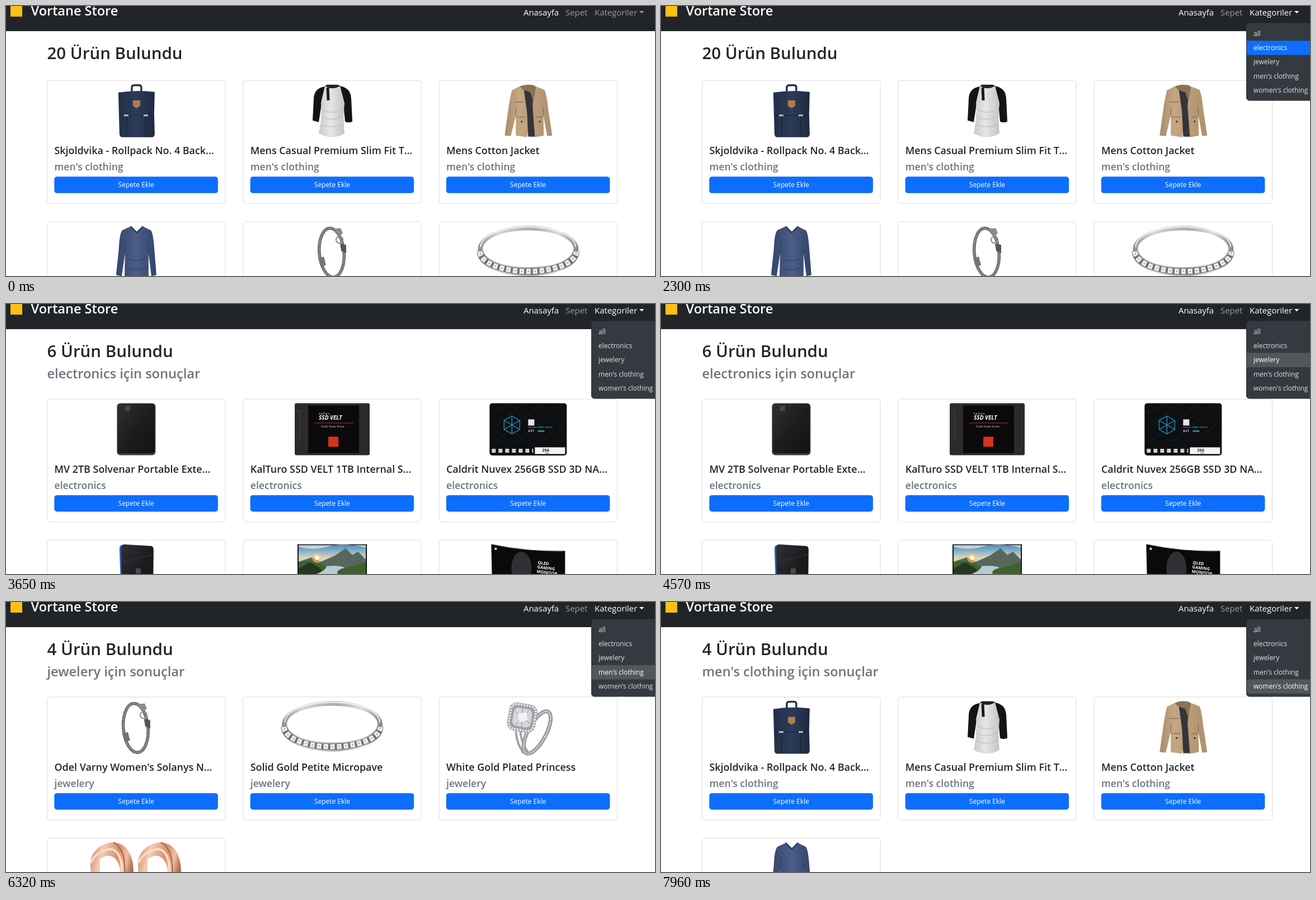
Recreate the animation shown at these times as an HTML page. Size 1160 by 483 pixels, loop 8000 ms.

```html
<!DOCTYPE html>
<html lang="tr">
<head>
<meta charset="utf-8">
<title>Vortane Store</title>
<style>
  html, body { margin: 0; width: 100%; height: 100%; overflow: hidden; background: #fff; }
  svg { display: block; width: 1160px; height: 483px; }
  text { font-family: "Open Sans", "Noto Sans", sans-serif; white-space: pre; }
  .h1 { font-size: 29.5px; font-weight: 600; fill: #212529; }
  .h3 { font-size: 23.6px; font-weight: 600; fill: #6c757d; }
  .title { font-size: 17.9px; font-weight: 600; fill: #212529; }
  .cat { font-size: 17.6px; font-weight: 600; fill: #6c757d; }
  .btn { font-size: 12px; fill: #fff; text-anchor: middle; }
  .brand { font-size: 23.5px; font-weight: 600; fill: #fff; }
  .nav { font-size: 14.9px; }
  .item { font-size: 12px; }
</style>
</head>
<body>
<svg viewBox="0 0 1160 483">
  <defs>
    <linearGradient id="navy" x2="1"><stop stop-color="#222f48"/><stop offset=".5" stop-color="#2b3b59"/><stop offset="1" stop-color="#1f2a41"/></linearGradient>
    <linearGradient id="white" x2="1"><stop stop-color="#c9c9cb"/><stop offset=".45" stop-color="#e6e6e7"/><stop offset="1" stop-color="#c4c4c7"/></linearGradient>
    <linearGradient id="tan" x2="1"><stop stop-color="#a98c6a"/><stop offset=".3" stop-color="#c4a683"/><stop offset="1" stop-color="#ae906d"/></linearGradient>
    <linearGradient id="blue" x2="1"><stop stop-color="#34456b"/><stop offset=".5" stop-color="#4b5e88"/><stop offset="1" stop-color="#33446a"/></linearGradient>
    <linearGradient id="silver" x2="1"><stop stop-color="#8d8d90"/><stop offset=".2" stop-color="#d6d6d8"/><stop offset=".55" stop-color="#a9a9ac"/><stop offset=".8" stop-color="#dcdcde"/><stop offset="1" stop-color="#838386"/></linearGradient>
    <linearGradient id="rose" x2="1" y2=".3"><stop stop-color="#c98264"/><stop offset=".3" stop-color="#f4cdb6"/><stop offset=".65" stop-color="#d5906f"/><stop offset=".85" stop-color="#f0bfa4"/><stop offset="1" stop-color="#b8704f"/></linearGradient>
    <linearGradient id="sky" x2="0" y2="1"><stop stop-color="#4d8fc4"/><stop offset=".3" stop-color="#d9d8c0"/><stop offset="1" stop-color="#7a8f60"/></linearGradient>
    <linearGradient id="case" x2="1" y2="1"><stop stop-color="#2e3033"/><stop offset=".5" stop-color="#1b1d1f"/><stop offset="1" stop-color="#111214"/></linearGradient>

    <g id="bag">
      <path d="M-8 13V5Q-8 1-3 1H5Q9 1 9 5V13" fill="none" stroke="#26334c" stroke-width="3.4"/>
      <path d="M-32 14Q0 9 33 13L32 52L33 88Q33 94 27 94H-24Q-30 94-30 88L-31 52Z" fill="url(#navy)"/>
      <path d="M-31 55H32M-17 55V92M17 55V92" stroke="#18233a" fill="none"/>
      <path d="M-6 28H7V38L.5 42L-6 38Z" fill="#b67b4a"/>
      <path d="M-22 55H-14M13 55H21" stroke="#b9bfc8" stroke-width="3"/>
    </g>
    <g id="raglan">
      <path d="M-12 3C-24 5-32 10-33 25L-35 64L-24 67L-19 34L-6 2ZM13 2C25 5 33 9 34 25L36 66Q29 69 23 66L20 34L6 2Z" fill="#141416"/>
      <path d="M-13 2L-20 32Q-18 60-24 87Q0 101 22 87Q19 60 22 33L14 2Q0 10-13 2Z" fill="url(#white)"/>
      <path d="M-13 2Q0 11 14 2L10 0H-9Z" fill="#222"/>
      <path d="M-8 5L-7 28" stroke="#1b1b1d" stroke-width="5"/>
      <path d="M-18 58Q0 66 18 57M-20 72Q0 79 18 71M-17 45Q-4 52 12 48" stroke="#b9b9bd" fill="none"/>
    </g>
    <g id="jacket">
      <path d="M-15 3L-29 10Q-33 25-37 55L-42 91L-31 92L-22 55L-22 91L-2 94L5 60L12 94L28 91L27 55L34 92L43 91L36 45Q33 16 29 9L13 3Q0-1-15 3Z" fill="url(#tan)"/>
      <path d="M-8 6L10 6L8 40L12 93H0L-2 50Z" fill="#34343a"/>
      <path d="M-15 3Q-4-2 10 1L14 4L9 30L4 14L-9 9Z" fill="#8d7252"/>
      <path d="M-25 31H-8M-21 58H-5M14 58H26M-22 41V56M27 40V56" stroke="#876c4d" fill="none" stroke-width="1.2"/>
      <path d="M-13 66h3M19 66h3" stroke="#4c3b28" stroke-width="3"/>
    </g>
    <g id="vneck">
      <path d="M-10 1L-25 8Q-30 14-31 40L-36 88L-26 90L-20 50L-21 94H22L22 50L27 90L36 88L32 38Q30 12 26 8L12 1L1 11Z" fill="url(#blue)"/>
      <path d="M-10 1L1 12L12 1" fill="none" stroke="#26355a" stroke-width="2.4"/>
      <path d="M-20 50L-18 28M22 50L20 28M-14 60Q0 66 16 58M-15 76Q2 82 18 74" fill="none" stroke="#2d3d62"/>
    </g>
    <g id="bracelet">
      <g transform="rotate(-5 -1 48)" fill="none">
        <ellipse cx="-1" cy="48" rx="22" ry="44" stroke="#626265" stroke-width="5.5"/>
        <ellipse cx="-1" cy="48" rx="22" ry="44" stroke="#b6b6b8" stroke-width="3" stroke-dasharray="1.5 2"/>
      </g>
      <path d="M4 5L15 4L19 13L12 20L8 13Z" fill="#8c8c90"/>
      <circle cx="13" cy="25" r="6" fill="none" stroke="#8a8a8d" stroke-width="2"/>
      <path d="M14 32L25 34V49L16 45Z" fill="#55565a"/>
      <path d="M-25 58L-15 55L-11 70L-19 73Z" fill="#747478"/>
    </g>
    <g id="band">
      <path fill-rule="evenodd" fill="url(#silver)" d="M-90 42A90 42 0 0 1 90 42V50A90 40 0 0 1-90 50ZM-81 41A81 33 0 0 0 81 41A81 33 0 0 0-81 41Z"/>
      <path d="M-85 38A85 36 0 0 1 85 38" fill="none" stroke="#f3f3f4" stroke-width="2"/>
      <path d="M-86 46A86 35.5 0 0 0 86 46" fill="none" stroke="#737377" stroke-width="11"/>
      <path d="M-86 46A86 35.5 0 0 0 86 46" fill="none" stroke="#f1f1f3" stroke-width="9" stroke-dasharray="8 4"/>
      <path d="M-86 46A86 35.5 0 0 0 86 46" fill="none" stroke="#aeaeb3" stroke-width="2.5" stroke-dasharray="3 9" stroke-dashoffset="-2.5"/>
    </g>
    <g id="gem">
      <g fill="none">
        <path d="M-22 54Q-20 78-8 93M-14 54Q-12 76 0 92" stroke="#a2a2a7" stroke-width="4"/>
        <ellipse cx="16" cy="56" rx="16" ry="42" transform="rotate(28 16 56)" stroke="#929297" stroke-width="7"/>
        <ellipse cx="16" cy="56" rx="16" ry="42" transform="rotate(28 16 56)" stroke="#e4e4e8" stroke-width="3" stroke-dasharray="2 1.5"/>
      </g>
      <rect x="-36" y="4" width="51" height="51" rx="14" transform="rotate(10 -10 29)" fill="#9fa0a7"/>
      <rect x="-33" y="7" width="45" height="45" rx="11" transform="rotate(10 -10 29)" fill="none" stroke="#e9e9ee" stroke-width="4" stroke-dasharray="3 2"/>
      <rect x="-27" y="13" width="33" height="33" rx="8" transform="rotate(10 -10 29)" fill="#d6d7dd"/>
      <path d="M-24 18L3 40M2 17L-23 42M-10 13L-12 46" stroke="#85868f"/>
      <path d="M-18 22L-3 20L-1 34L-16 38Z" fill="#f2f2f5"/>
    </g>
    <g id="hoop">
      <path fill-rule="evenodd" fill="url(#rose)" d="M-39 38C-38 14-18 1 2 0C26 0 40 25 38 60L34 100H-24L-38 60ZM-22 30C-6 18 10 25 14 48L14 100H-15L-22 60Z"/>
      <path d="M2 0C19 9 25 30 22 70" fill="none" stroke="#a8613f" stroke-width="2"/>
      <path d="M-38 37C-34 25-20 13-2 12C10 14 18 28 17 54" fill="none" stroke="#f8dccb" stroke-width="4"/>
    </g>
    <g id="hoops"><use href="#hoop" x="-43"/><use href="#hoop" x="42"/></g>
    <g id="disk">
      <rect x="-34.5" width="69" height="93" rx="6" fill="#3a3c3f"/>
      <rect x="-33" y="1.5" width="66" height="88" rx="5" fill="url(#case)"/>
      <rect x="-20" y="5" width="9" height="9" fill="#45484c"/>
    </g>
    <g id="ssd">
      <rect x="-67" width="134" height="93" rx="3" fill="#2d2a2a"/>
      <path d="M-66 14H-58V66H-66" fill="none" stroke="#4b4746"/>
      <rect x="-43" y="4" width="91" height="85" fill="#0b090b"/>
      <text x="-24" y="21" font-size="5.5" fill="#ddd">KalTuro</text>
      <text x="-24" y="30" font-size="10" font-weight="700" font-style="italic" fill="#fff">SSD VELT</text>
      <path d="M-33 35.5H38" stroke="#9a3a2d"/>
      <text x="-20" y="44" font-size="5.5" fill="#ccc">Solid State Drive</text>
      <rect x="-7" y="60" width="18" height="18" fill="#d8311f"/>
    </g>
    <g id="dark">
      <rect x="-69" width="138" height="93.5" rx="5" fill="#0d0f11"/>
      <path d="M-69 20L-30 1M-69 50L-8 1M-60 70L25 1M-20 70L60 2M20 70L68 30" stroke="#1d262c"/>
      <path d="M-29 23L-15 31V47L-29 55L-43 47V31ZM-43 31L-15 47M-15 31L-43 47M-29 23V55" fill="none" stroke="#1f86b5" stroke-width="1.5"/>
      <rect x="0" y="29" width="11" height="11" fill="#e5e5e5"/>
      <text y="45" font-size="4" letter-spacing=".5" fill="#ccc">SOLID STATE DRIVE</text>
      <text y="52" font-size="6" font-weight="600" fill="#eee">K27</text>
      <path d="M17 50H29" stroke="#2d80a8" stroke-width="3"/>
      <path d="M-65 85H9" stroke="#d0d0d0" stroke-width="7" stroke-dasharray="7 5"/>
      <rect x="12" y="79" width="54" height="12" fill="#f2f2f2"/>
      <text x="25" y="87" font-size="7.5" font-weight="700" fill="#222">256</text>
      <text x="31" y="91" font-size="4" fill="#222">GB</text>
    </g>
    <g id="slim">
      <path d="M-25 1Q-30 2-30 8L-27 95H-15V1Z" fill="#3657b5"/>
      <path d="M-22 0L27 3Q31 4 31 10L30 95H-25L-27 7Q-27 1-22 0Z" fill="url(#case)"/>
      <path d="M-25 32L30 18" stroke="#3b3d41"/>
      <rect x="-1" y="43" width="9" height="9" fill="#4a4c50"/>
    </g>
    <g id="screen">
      <rect x="-62" width="124" height="80" fill="#111"/>
      <rect x="-60" y="1.5" width="120" height="78" fill="url(#sky)"/>
      <path d="M-60 4Q-35 12-8 4T60 6V1.5H-60Z" fill="#e6ebec" opacity=".7"/>
      <path d="M-60 31L-36 23L-20 31L5 20L24 7L36 19L46 13L60 27V55H-60Z" fill="#56675c"/>
      <path d="M-60 33Q-40 25-15 38T60 32V80H-60Z" fill="#3f612a"/>
      <path d="M-60 43L-40 32L-22 42L-10 60H-60Z" fill="#23391e"/>
      <path d="M-10 39Q14 37 22 42Q3 47 12 55H-34Q-12 48-10 39Z" fill="#b8cad3"/>
      <circle cx="-27" cy="24" r="9" fill="#ffc46b" opacity=".6"/><circle cx="-27" cy="24" r="4" fill="#fff5d1"/>
    </g>
    <g id="curved">
      <path d="M-66 0Q0 14 66 12V90H-64Z" fill="#090a0c"/>
      <path d="M-66 0Q0 14 66 12" fill="none" stroke="#4a4b4e"/>
      <rect x="-60" y="6" width="4" height="4" fill="#ccc"/>
      <ellipse cx="-12" cy="43" rx="18" ry="30" fill="#2e3033"/>
      <g transform="rotate(7 17 35)" font-size="7.5" font-weight="700" fill="#fff">
        <text x="17" y="35">QLED</text><text x="17" y="43">GAMING</text><text x="17" y="51">MONITOR</text>
      </g>
    </g>
  </defs>

  <g id="body"></g>
  <rect width="1160" height="45" fill="#212529"/>
  <rect x="8" y="-2" width="21" height="21" fill="#fcbf12"/>
  <text class="brand" x="44.5" y="17">Vortane Store</text>
  <text class="nav" x="925" y="17" fill="#fff">Anasayfa</text>
  <text class="nav" x="1000" y="17" fill="#9b9d9f">Sepet</text>
  <g id="toggle"><text class="nav" x="1052" y="17">Kategoriler</text><path d="M1132 9H1140.5L1136.2 13.2Z"/></g>
  <g id="menu"></g>
</svg>
<script>
const LOOP = 8000;
const MEN = "men's clothing", EL = "electronics", JW = "jewelery";
const CATS = ["all", EL, JW, MEN, "women's clothing"];

// art id, title
const products = {
  [MEN]: [["bag", "Skjoldvika - Rollpack No. 4 Back…"], ["raglan", "Mens Casual Premium Slim Fit T…"],
          ["jacket", "Mens Cotton Jacket"], ["vneck", "Mens Casual Slim Fit"]],
  [JW]: [["bracelet", "Odel Varny Women's Solanys N…"], ["band", "Solid Gold Petite Micropave"],
         ["gem", "White Gold Plated Princess"], ["hoops", "Rose Gold Plated Rings"]],
  [EL]: [["disk", "MV 2TB Solvenar Portable Exte…"], ["ssd", "KalTuro SSD VELT 1TB Internal S…"],
         ["dark", "Caldrit Nuvex 256GB SSD 3D NA…"], ["slim", "Portable Gaming Drive"],
         ["screen", "21.5 inches Full HD"], ["curved", "49-Inch Curved Monitor"]]
};
const tagged = cat => products[cat].map(p => [...p, cat]);
const pages = {
  all: { count: 20, cards: [...tagged(MEN), ...tagged(JW).slice(0, 2)] },
  [EL]: { count: 6, cards: tagged(EL) },
  [JW]: { count: 4, cards: tagged(JW) },
  [MEN]: { count: 4, cards: tagged(MEN) }
};

// Step tracks: [time, value]
const pageTrack = [[0, "all"], [2640, EL], [5090, JW], [6790, MEN]];
const queryTrack = [[0, ""], [2370, EL], [4930, JW], [6610, MEN]];
const IDLE = 0, HOVER = 1, OPEN = 2;
const toggleTrack = [[0, IDLE], [1320, HOVER], [1650, OPEN], [2370, IDLE], [2800, HOVER], [3650, OPEN],
  [4930, IDLE], [5130, HOVER], [5740, OPEN], [6610, IDLE], [7420, HOVER], [7670, OPEN]];
const hoverTrack = [[0, -1], [1880, 0], [2010, 1], [2370, -1], [3770, 0], [3880, 1], [4570, 2], [4930, -1],
  [5800, 0], [5870, 1], [5940, 2], [6000, 3], [6070, 4], [6320, 3], [6610, -1],
  [7730, 0], [7790, 1], [7850, 2], [7910, 3], [7960, 4]];
const pressTrack = [[0, false], [2300, true], [2370, false], [4830, true], [4930, false], [6530, true], [6610, false]];

const at = (track, t) => track.reduce((v, [time, next]) => time <= t ? next : v, track[0][1]);
const $ = id => document.getElementById(id);

function card([art, title, cat], i) {
  const x = 73.5 + (i % 3) * 350.25, y = 133.3 + Math.floor(i / 3) * 252.5;
  return `<g transform="translate(${x} ${y})">
    <rect width="318.5" height="220" rx="5" fill="#fff" stroke="#dcdcdc"/>
    <use href="#${art}" x="159.3" y="7.5"/>
    <text class="title" x="13" y="132">${title}</text>
    <text class="cat" x="13" y="161">${cat}</text>
    <rect x="12.8" y="172" width="292.6" height="29.5" rx="4.8" fill="#0d6efd"/>
    <text class="btn" x="159.2" y="191.2">Sepete Ekle</text></g>`;
}

function drawBody(page, query) {
  const { count, cards } = pages[page];
  const sub = query && `<text class="h3" x="73.5" y="133">${query} için sonuçlar</text>`;
  $("body").innerHTML = `<text class="h1" x="73.5" y="95">${count} Ürün Bulundu</text>${sub}
    <g transform="translate(0 ${query ? 36.6 : 0})">${cards.map(card).join("")}</g>`;
}

function drawMenu(toggle, hover, press) {
  $("toggle").setAttribute("fill", ["#9b9d9f", "#c8c9ca", "#fff"][toggle]);
  const rows = CATS.map((cat, i) => {
    const y = 36.8 + i * 25.4, on = i === hover;
    const back = on ? `<rect x="1047" y="${y}" width="113" height="25.4" fill="${press ? "#0d6efd" : "#52575c"}"/>` : "";
    return `${back}<text class="item" x="1059" y="${y + 16.8}" fill="${on ? "#fff" : "#dee2e6"}">${cat}</text>`;
  });
  $("menu").innerHTML = toggle === OPEN
    ? `<rect x="1046.5" y="30.5" width="125" height="138.5" rx="5" fill="#343a40" stroke="#2c3136"/>${rows.join("")}` : "";
}

let bodyKey, menuKey;
function frame() {
  const t = performance.now() % LOOP;
  const body = [at(pageTrack, t), at(queryTrack, t)];
  const menu = [at(toggleTrack, t), at(hoverTrack, t), at(pressTrack, t)];
  if (bodyKey !== (bodyKey = body.join())) drawBody(...body);
  if (menuKey !== (menuKey = menu.join())) drawMenu(...menu);
  requestAnimationFrame(frame);
}
frame();
</script>
</body>
</html>
```
